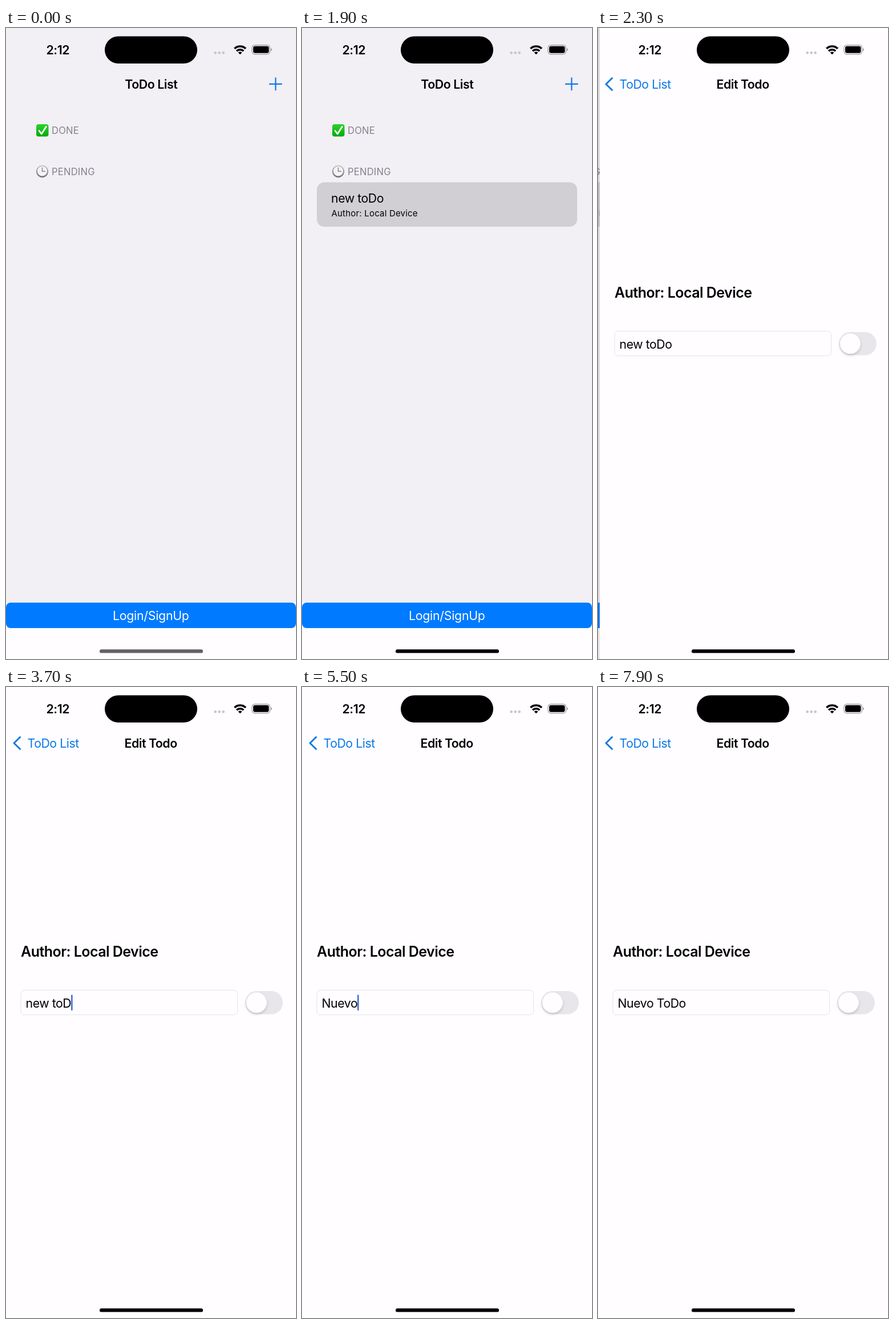
Animation of 508x1102 px, one loop 8 s. Source, as an HTML page:

```html
<!DOCTYPE html>
<html lang="en">
<head>
<meta charset="utf-8">
<title>ToDo List</title>
<style>
  html, body { margin: 0; width: 100%; height: 100%; overflow: hidden; background: #fffdff; }
  svg { display: block; width: 508px; height: 1102px; }
  text {
    font-family: Inter, "Liberation Sans", sans-serif;
    font-size: 21.3px;
    font-optical-sizing: none;
    letter-spacing: -.45px;
    white-space: pre;
  }
  .bold { font-weight: 600; }
  .mid { text-anchor: middle; }
  .head { font-size: 16.6px; letter-spacing: .2px; fill: #85838a; }
  .small { font-size: 15px; letter-spacing: .2px; }
  .author { font-size: 25px; letter-spacing: -.55px; }
  .blue { fill: #0b79e6; }
  .line { fill: none; stroke: #0b79e6; }
</style>
</head>
<body>
<svg viewBox="0 0 508 1102">
  <defs>
    <linearGradient id="green" x2="0" y2="1">
      <stop offset="0" stop-color="#2fd32f"/><stop offset="1" stop-color="#04a80b"/>
    </linearGradient>
    <linearGradient id="rim" x2="0" y2="1">
      <stop offset="0" stop-color="#c9c9cb"/><stop offset="1" stop-color="#6f6f73"/>
    </linearGradient>
    <filter id="soft" x="-30%" y="-30%" width="160%" height="160%">
      <feDropShadow dx="0" dy="2.5" stdDeviation="2.5" flood-opacity=".18"/>
    </filter>
  </defs>

  <g id="list">
    <rect width="508" height="1102" fill="#fffdff"/>
    <rect width="508" height="1003" fill="#f2eff5"/>

    <rect x="53" y="168" width="21.5" height="21.5" rx="4" fill="url(#green)"/>
    <path d="M58 179.500l4.200 5.500l8-12.500" fill="none" stroke="#fff" stroke-width="2.800" stroke-linecap="round" stroke-linejoin="round"/>
    <text class="head" x="80" y="184.600">DONE</text>

    <circle cx="63.500" cy="250.500" r="10.700" fill="url(#rim)"/>
    <circle cx="63.500" cy="250" r="8.600" fill="#f3f3f4"/>
    <path d="M63.500 243.500v6.800h5.500" fill="none" stroke="#77777b" stroke-width="1.300"/>
    <text class="head" x="80" y="256.600">PENDING</text>

    <g id="row">
      <rect id="cell" x="26" y="269.500" width="456" height="77.500" rx="13"/>
      <text x="51" y="304.800">new toDo</text>
      <text class="small" x="51.500" y="328.700">Author: Local Device</text>
    </g>

    <rect y="1003.500" width="508" height="44.500" rx="8" fill="#007aff"/>
    <text class="mid" x="253.800" y="1033.700" fill="#fff" style="letter-spacing:-.25px">Login/SignUp</text>
  </g>
  <rect id="dim" width="508" height="1102"/>

  <g id="detail">
    <rect width="508" height="1102" fill="#fffdff"/>
    <text class="bold author" x="26" y="471">Author: Local Device</text>
    <rect x="26" y="529.500" width="379.500" height="43" rx="6" fill="#fffdff" stroke="#e5e3e8"/>
    <text id="field" x="34.500" y="559.500"></text>
    <rect id="caret" y="537.500" width="2.500" height="27.500" rx="1" fill="#3d68d8"/>
    <rect x="419" y="531" width="66" height="40.500" rx="20.250" fill="#e8e6ea"/>
    <circle cx="438.800" cy="551.200" r="17.800" fill="#fffdff" filter="url(#soft)"/>
  </g>

  <text id="listTitle" class="bold mid" x="254.300" y="105.500">ToDo List</text>
  <path id="plus" class="line" d="M461 97.800h22.500M472.300 86.500v22.500" stroke-width="2.200"/>
  <g id="bar">
    <path class="line" d="M25.500 86.800l-11.500 11.200l11.500 11.200" stroke-width="3" stroke-linejoin="round"/>
    <text id="back" class="blue" x="37.500" y="105.500">ToDo List</text>
    <text id="editTitle" class="bold mid" x="253.600" y="105.500">Edit Todo</text>
  </g>

  <text class="bold" x="70.500" y="45.800">2:12</text>
  <rect x="173" y="14.500" width="162" height="47.500" rx="23.750"/>
  <path d="M366.700 43.200h21" fill="none" stroke="#c5c3c9" stroke-width="4.600" stroke-linecap="round" stroke-dasharray="0 7"/>
  <g fill="none" stroke="#000" stroke-width="3.400">
    <path d="M400.300 36a14 14 0 0 1 19.600 0"/>
    <path d="M404 40.200a8.700 8.700 0 0 1 12.200 0"/>
  </g>
  <path d="M410.100 46.300l-3.300-3.400a4.700 4.700 0 0 1 6.600 0z"/>
  <rect x="431" y="29.800" width="31.500" height="16" rx="5" fill="none" stroke="#99979c" stroke-width="1.200"/>
  <rect x="433" y="31.800" width="27.500" height="12" rx="3.300"/>
  <path d="M464 35.200q2 .8 2 2.600t-2 2.600z" fill="#99979c"/>
  <rect id="home" x="164" y="1085.200" width="181" height="6.400" rx="3.200"/>
</svg>
<script>
const LOOP = 8000, STEP = 200, WIDTH = 508;
const OLD = "new toDo", NEW = "Nuevo ToDo";
const ui = {};
document.querySelectorAll("[id]").forEach(e => ui[e.id] = e);

// [time, text, letters shown]
const edits = [
  [0, OLD, 8], [3700, OLD, 7], [3900, OLD, 6], [4100, OLD, 4], [4300, OLD, 3], [4500, OLD, 1], [4700, OLD, 0],
  [5300, NEW, 2], [5500, NEW, 5], [5700, NEW, 7], [5900, NEW, 8], [7100, NEW, 9], [7300, NEW, 10]
];
// [time, caret opacity]
const blinks = [[0, 0], [3100, 1], [6300, .5], [6500, 0], [6700, 1], [7900, 0]];

const latest = (keys, t) => keys.filter(k => k[0] <= t).pop();
const shift = (el, x) => el.setAttribute("transform", `translate(${x.toFixed(2)} 0)`);
const fade = (el, v) => el.style.opacity = v;

// Critically damped spring: 1 before the push, settling to 0
function spring(t) {
  if (t <= 1900) return 1;
  const w = .017 * (t - 1876);
  return (1 + w) * Math.exp(-w);
}

function drawPush(t) {
  const rest = spring(t), x = Math.round(WIDTH * rest), pushed = t > 1900;
  const lag = Math.max(0, x - 3);
  shift(ui.detail, x);
  shift(ui.list, -.3 * (WIDTH - x));
  fade(ui.dim, .1 * (1 - rest));
  fade(ui.listTitle, pushed ? 0 : 1);
  fade(ui.plus, pushed ? Math.min(1, lag / WIDTH) : 1);
  fade(ui.bar, pushed ? 1 : 0);
  shift(ui.back, .38 * lag);
  shift(ui.editTitle, .64 * lag);
  fade(ui.editTitle, 1 - 2 * lag / WIDTH);
}

function drawRow(t) {
  fade(ui.row, t < 500 ? 0 : 1 - Math.pow(Math.max(0, 1100 - t) / 800, 2));
  ui.cell.setAttribute("fill", t < 1900 ? "#fffdff" : "#d1ced4");
  ui.home.setAttribute("fill", t < 1900 ? "#626164" : "#000");
}

function drawField(t) {
  const [, text, count] = latest(edits, t);
  const shown = text.slice(0, count);
  if (ui.field.textContent !== shown) ui.field.textContent = shown;
  ui.caret.setAttribute("x", 34.3 + (count ? ui.field.getComputedTextLength() : 0));
  fade(ui.caret, latest(blinks, t)[1]);
}

const start = performance.now();
function draw() {
  const now = (performance.now() - start) % LOOP;
  const t = Math.max(0, Math.floor((now + 100) / STEP) * STEP - 100);
  drawRow(t);
  drawPush(t);
  drawField(t);
  requestAnimationFrame(draw);
}
draw();
</script>
</body>
</html>
```
